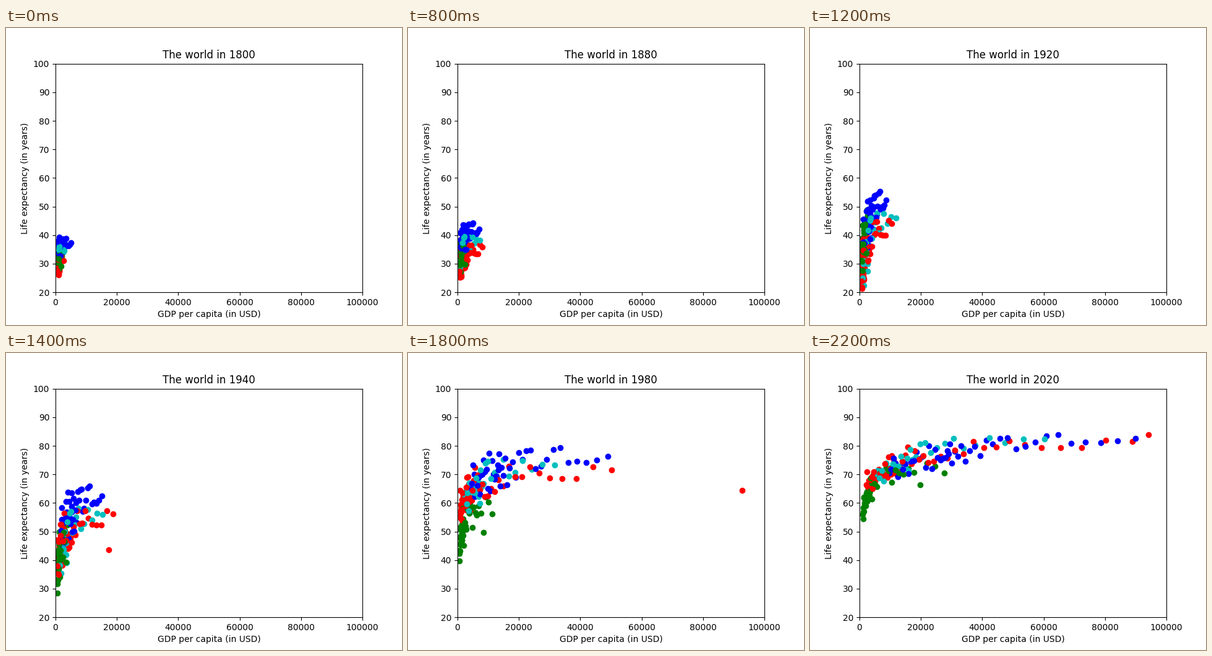
Animation, 640 px wide and 480 px high, one loop 2.3 s. Source, as a matplotlib script:

```python
import matplotlib.pyplot as plt
import numpy as np
from matplotlib.animation import FuncAnimation

YEARS = np.arange(1800, 2021, 10)
KEYS = (1800, 1880, 1920, 1960, 2000, 2020)
rng = np.random.default_rng(4)


def curve(values, keys=KEYS):
    return np.interp(YEARS, keys, values)


def growth(values, keys=KEYS):
    """Interpolate at a constant rate of growth."""
    return np.exp(curve(np.log(values), keys))


# How much life expectancy follows income, and how much it scatters
SLOPE = curve((2, 4, 10, 6, 6, 7))
SCATTER = curve((1.8, 2.6, 4.2, 4.2, 2.7, 2.1))


def region(color, count, ratio, typical, top, life):
    """Spread countries from poor to rich; longer lives level off with income.

    typical and top are GDP per capita in thousands, ratio is typical / poorest.
    """
    mid, high, life = growth(typical), growth(top), curve(life)
    low = np.maximum(mid / ratio, .6)
    for rank in np.linspace(-1, 1, count):
        edge = high if rank > 0 else low
        income = np.log(edge / mid) * abs(rank) ** 1.4
        luck = np.clip(rng.normal(), -2, 2)
        years = life + SLOPE * np.tanh(income) + SCATTER * luck
        yield color, 1000 * mid * np.exp(income), years


def oil_state():
    keys = (1920, 1950, 1960, 1970, 2000, 2020)
    gdp = growth((2.6, 45, 75.6, 93, 92, 94.2), keys)
    return "r", 1000 * gdp, curve((31, 50, 55.7, 62, 69.2, 83.9), keys)


countries = [
    *region("b", 47, 3, (1.4, 2.3, 3.4, 8, 22, 29), (5, 7, 8.6, 26.7, 90, 90),
            (36, 39.5, 46, 68.5, 75.5, 77.5)),
    *region("r", 57, 5, (.9, 1.1, 1.3, 2.6, 5, 11), (1.8, 8, 10.4, 33.7, 74.8, 89),
            (29.5, 30, 31, 59, 67, 73)),
    *region("c", 31, 3, (1.05, 1.6, 2.7, 5, 10.5, 16), (2.9, 7.3, 11.8, 20, 49.8, 60.3),
            (32, 33, 34.5, 58, 73.5, 75)),
    *region("g", 53, 3, (.85, .9, .95, 1.6, 1.9, 3.2), (2, 2.8, 2.7, 6.2, 20.4, 27.7),
            (31.5, 32, 35, 48, 54, 64)),
    oil_state(),
]
order = rng.permutation(len(countries))

fig, ax = plt.subplots(figsize=(6.4, 4.8), dpi=100)
ax.set(xlim=(0, 100000), ylim=(20, 100),
       xlabel="GDP per capita (in USD)", ylabel="Life expectancy (in years)")
title = ax.set_title("The world in 1800")
tracks = []
for i in order:
    color, gdp, life = countries[i]
    dot, = ax.plot(gdp[:1], life[:1], "o", color=color)
    tracks.append((dot, gdp, life))


def update(i):
    for dot, gdp, life in tracks:
        dot.set_data(gdp[i:i + 1], life[i:i + 1])
    title.set_text(f"The world in {YEARS[i]}")


anim = FuncAnimation(fig, update, frames=len(YEARS), interval=100,
                     repeat=True, repeat_delay=0)
plt.show()
```
